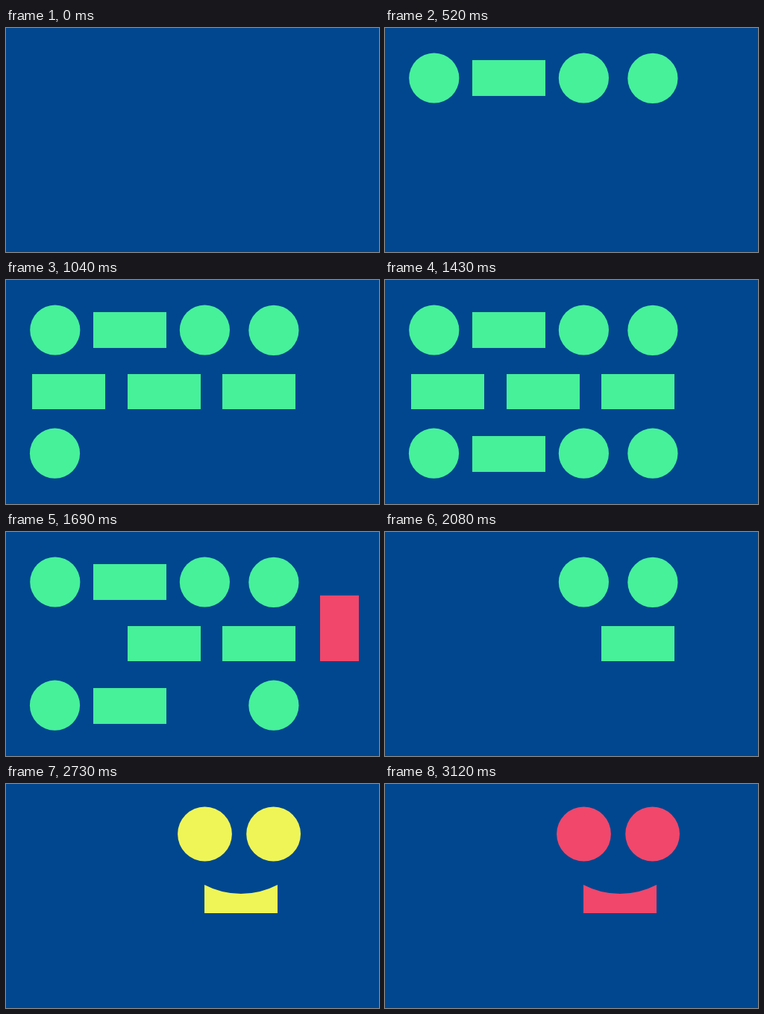
An HTML page with a canvas that plays this animation: 500x300 px, repeating every 3.25 s.

```html
<!DOCTYPE html>
<html lang="en">
<head>
<meta charset="utf-8">
<title>Shapes to smile</title>
<style>
  html, body { margin: 0; width: 100%; height: 100%; overflow: hidden; background: #00478f; }
  canvas { display: block; }
</style>
</head>
<body>
<canvas id="stage" width="500" height="300"></canvas>
<script>
const ctx = document.getElementById('stage').getContext('2d');
const STEP = 130, STEPS = 25;
const BLUE = '#00478f', GREEN = '#46f19a', RED = '#f0476b', YELLOW = '#eff556';

function circle(x, y, r, color) {
  ctx.fillStyle = color;
  ctx.beginPath();
  ctx.arc(x, y, r, 0, Math.PI * 2);
  ctx.fill();
}

function rect(x, y, w, h, color) {
  ctx.fillStyle = color;
  ctx.fillRect(x, y, w, h);
}

const dot = (x, y) => () => circle(x, y, 33.6, GREEN);
const bar = (x, y, h) => () => rect(x, y, 98, h, GREEN);

// Each shape is visible from step `from` up to step `to`.
const shapes = [
  { from: 1, to: 16, draw: dot(65.8, 67) },
  { from: 2, to: 15, draw: bar(117, 43, 48) },
  { from: 3, to: 19, draw: dot(266.4, 67) },
  { from: 4, to: 19, draw: dot(358.9, 67.4) },
  { from: 5, to: 13, draw: bar(35, 126, 47) },
  { from: 6, to: 14, draw: bar(163, 126, 47) },
  { from: 7, to: 17, draw: bar(290, 126, 47) },
  { from: 8, to: 14, draw: dot(65.5, 232.2) },
  { from: 9, to: 16, draw: bar(117, 209, 48) },
  { from: 10, to: 13, draw: dot(266.4, 232.2) },
  { from: 11, to: 15, draw: dot(358.9, 232.2) },
  { from: 12, to: 15, draw: () => rect(421, 85, 52, 88, RED) },
  { from: 17, to: 18, draw: bar(266, 126, 47) }
];

function eyes(r, color) {
  circle(266.5, 67, r, color);
  circle(358.6, 67, r, color);
}

function smile(color) {
  ctx.fillStyle = color;
  ctx.beginPath();
  ctx.moveTo(266, 134.5);
  ctx.arc(315, 41, 106, Math.PI - Math.acos(49 / 106), Math.acos(49 / 106), true);
  ctx.lineTo(364, 173);
  ctx.lineTo(266, 173);
  ctx.fill();
}

function draw(step) {
  rect(0, 0, 500, 300, BLUE);
  for (const s of shapes) if (step >= s.from && step < s.to) s.draw();
  const color = step < 21 ? GREEN : step % 2 ? YELLOW : RED;
  if (step >= 18) smile(color);
  if (step >= 19) eyes(step === 19 ? 35 : 36.4, color);
}

const start = performance.now();
function tick() {
  draw(Math.floor((performance.now() - start) / STEP) % STEPS);
  requestAnimationFrame(tick);
}
tick();
</script>
</body>
</html>
```
